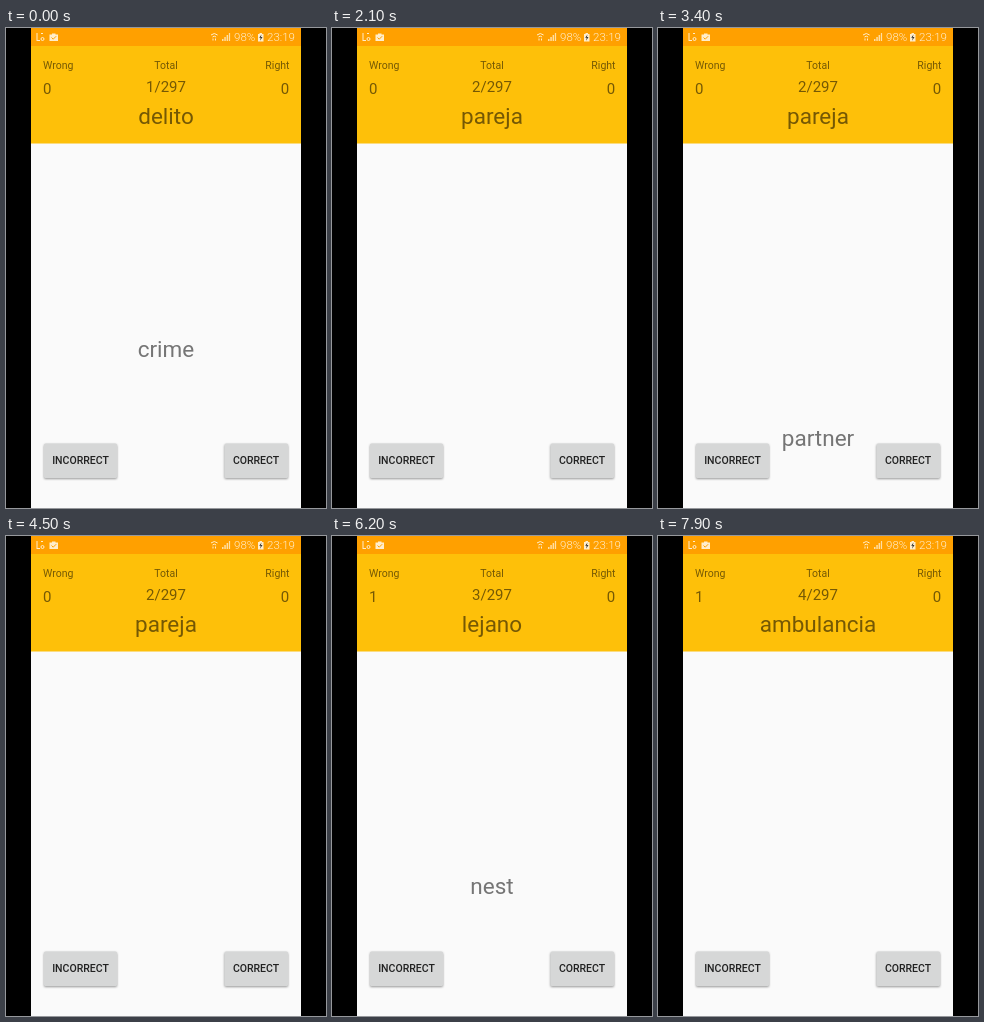
Recreate the animation shown at these times as an HTML page. Size 320x480 px, loop 8 s.

```html
<!DOCTYPE html>
<html lang="en">
<head>
<meta charset="utf-8">
<title>Falling word quiz</title>
<style>
  html, body { margin: 0; width: 100%; height: 100%; overflow: hidden; background: #000; }
  svg { display: block; width: 100vw; height: 100vh; font-family: Roboto, sans-serif; }
  .mid { text-anchor: middle; }
  .end { text-anchor: end; }
  .label { font-size: 10.5px; }
  .count { font-size: 15px; }
  .word { font-size: 22.5px; }
  .button rect { fill: #d6d7d7; }
  .button text { font-size: 10.5px; font-weight: 500; fill: #212121; }
</style>
</head>
<body>
<svg viewBox="0 0 320 480">
  <clipPath id="area"><rect x="25" y="115.5" width="270" height="365"/></clipPath>
  <rect width="320" height="480"/>
  <rect x="25" width="270" height="480" fill="#fafafa"/>
  <rect x="25" width="270" height="115.5" fill="#fec009"/>
  <rect x="25" width="270" height="18" fill="#ffa000"/>

  <!-- Status bar -->
  <g fill="#ffedcc" font-size="11.5">
    <path d="M31 5v8M31 12.5h3M35 5.5h2" fill="none" stroke="#ffedcc"/>
    <circle cx="36.5" cy="11" r="1.5" fill="none" stroke="#ffedcc"/>
    <path d="M43.5 6.5h2.5v-1h3.5v1h2.5v6.5h-8.5z"/>
    <path d="M45.5 9.5l1.7 1.7 3-3" fill="none" stroke="#ffa000"/>
    <path d="M205 7q3.300-3 6.600 0M206.500 9q1.800-1.600 3.600 0M207 12.500v-2M209.500 10.500v2" fill="none" stroke="#ffedcc"/>
    <path d="M216 13v-2h1.500v2zM218.300 13v-4h1.500v4zM220.600 13v-6h1.500v6zM222.900 13v-8h1.200v8z" opacity=".8"/>
    <path d="M252 6h1.500v-1h2.500v1h1.500v7.500h-5.500z"/>
    <path d="M255.500 6.500l-2.300 3.300h1.500l-.6 3 2.400-3.700h-1.600z" fill="#333"/>
    <text x="228" y="13.200" font-weight="300">98%</text>
    <text x="261" y="13.200" font-weight="300">23:19</text>
  </g>

  <!-- Score header -->
  <g fill-opacity=".54">
    <text class="label" x="37" y="41">Wrong</text>
    <text class="label mid" x="160" y="41">Total</text>
    <text class="label end" x="283.500" y="41">Right</text>
    <text class="count" id="wrong" x="37" y="66.300">0</text>
    <text class="count mid" id="total" x="160" y="64"></text>
    <text class="count end" x="283.300" y="66.300">0</text>
    <text class="word mid" id="prompt" x="160" y="96"></text>
  </g>

  <g class="button">
    <rect x="38" y="415.500" width="73" height="34.500" rx="1.500" style="filter:drop-shadow(0 1px 1px #0006)"/>
    <text class="mid" x="74.500" y="436.300">INCORRECT</text>
  </g>
  <g class="button">
    <rect id="correct" x="218.500" y="415.500" width="63.500" height="34.500" rx="1.500"/>
    <text class="mid" x="250" y="436.300">CORRECT</text>
  </g>

  <g clip-path="url(#area)">
    <text class="word mid" id="answer" x="160" fill="#757575"></text>
  </g>
</svg>
<script>
const LOOP = 8000, STEP = 100, SPEED = 0.2433, CLICK = 5600;
// Prompt, falling answer, and the moment the answer reaches MIDWAY
const MIDWAY = 247.5;
const rounds = [
  ['delito', 'crime', -337],
  ['pareja', 'partner', 2700],
  ['lejano', 'nest', 5747],
  ['ambulancia', '', 8794]
];
const ROUND_END = 1950;
const $ = id => document.getElementById(id);
const clamp = v => Math.max(0, Math.min(1, v));

function draw(now) {
  const t = Math.floor(now % LOOP / STEP) * STEP;
  const i = rounds.findIndex(r => t < r[2] + ROUND_END);
  const [prompt, answer, mid] = rounds[i];

  $('prompt').textContent = prompt;
  $('total').textContent = `${i + 1}/297`;
  $('wrong').textContent = t >= CLICK ? 1 : 0;
  $('answer').textContent = answer;
  $('answer').setAttribute('y', MIDWAY + SPEED * (t - mid));

  // The pressed button rises, then settles
  const lift = clamp((t - 5350) / 150) * clamp((5900 - t) / 200);
  $('correct').style.filter = `drop-shadow(0 ${1 + lift}px ${1 + lift}px #0006)`;
  requestAnimationFrame(draw);
}
requestAnimationFrame(draw);
</script>
</body>
</html>
```
